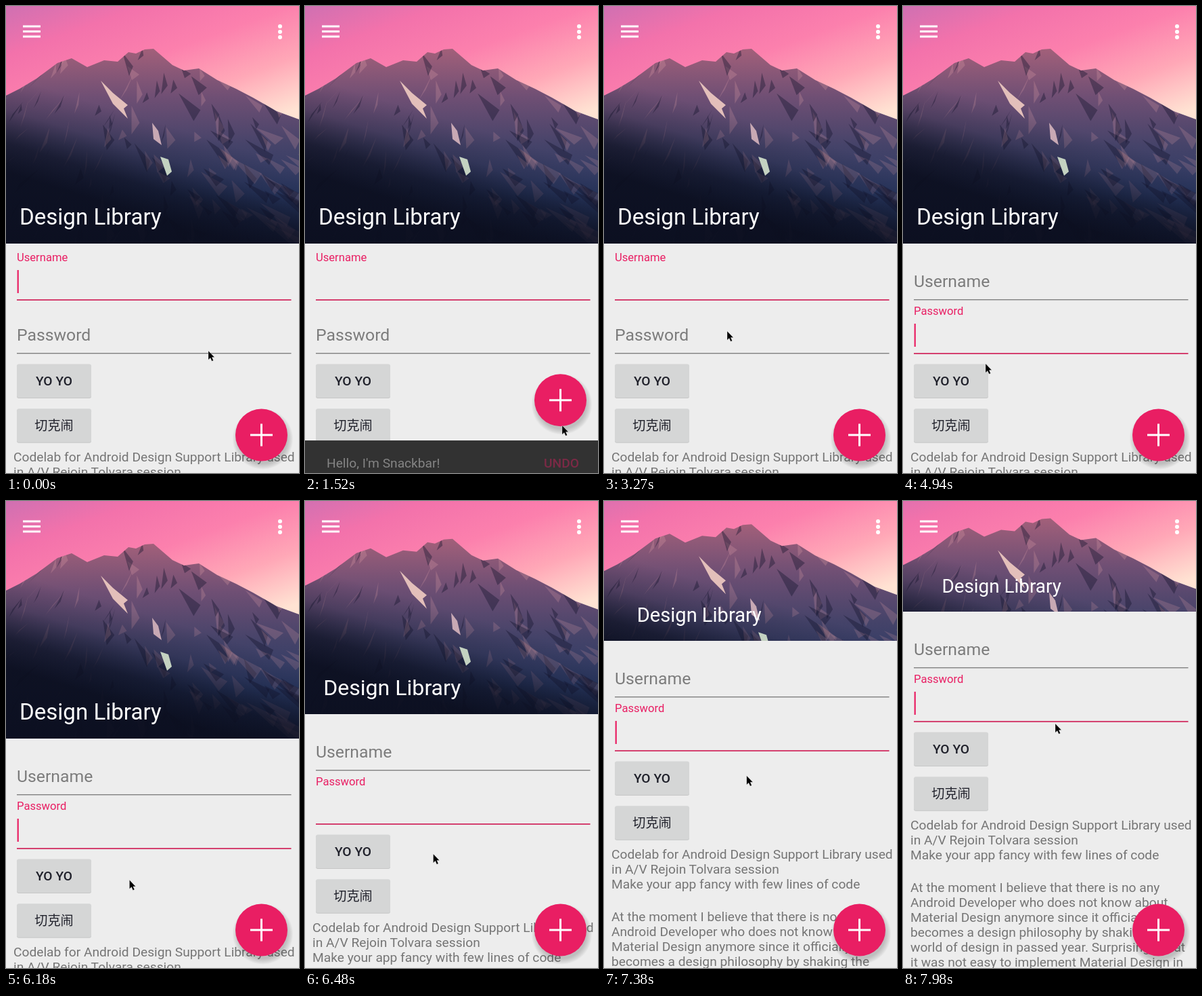
Animation of 433 by 688 pixels, one loop 8 s. Source, as an HTML page:

```html
<!DOCTYPE html>
<html lang="en">
<head>
<meta charset="utf-8">
<title>Design Library</title>
<style>
  html, body { margin: 0; width: 100%; height: 100%; overflow: hidden; background: #ededed; }
  svg { display: block; width: 100%; height: 100%; }
  text { font-family: Roboto, "Noto Sans CJK SC", "Noto Sans CJK", sans-serif; white-space: pre; }
  .body { font-size: 19.2px; fill: #757575; }
  .button { font-size: 19.2px; font-weight: 500; fill: #20212b; text-anchor: middle; }
</style>
</head>
<body>
<svg viewBox="0 0 433 688" preserveAspectRatio="none">
  <defs>
    <linearGradient id="sky" gradientUnits="userSpaceOnUse" x1="0" y1="0" x2="99" y2="272">
      <stop offset="0" stop-color="#cf70b2"/>
      <stop offset=".24" stop-color="#f372ab"/>
      <stop offset=".5" stop-color="#fc80ad"/>
      <stop offset=".75" stop-color="#ffa8b7"/>
      <stop offset="1" stop-color="#ffe3d3"/>
    </linearGradient>
    <linearGradient id="rock" gradientUnits="userSpaceOnUse" x1="0" y1="62" x2="0" y2="350">
      <stop offset="0" stop-color="#a3607a"/>
      <stop offset=".25" stop-color="#6f4f74"/>
      <stop offset=".5" stop-color="#454369"/>
      <stop offset=".75" stop-color="#2a3963"/>
      <stop offset="1" stop-color="#172444"/>
    </linearGradient>
    <linearGradient id="wood" gradientUnits="userSpaceOnUse" x1="220" y1="170" x2="180" y2="300">
      <stop offset="0" stop-color="#0b0e1e" stop-opacity="0"/>
      <stop offset=".35" stop-color="#0b0e1e" stop-opacity=".2"/>
      <stop offset=".7" stop-color="#0b0e1e" stop-opacity=".72"/>
      <stop offset="1" stop-color="#0b0e1e" stop-opacity=".93"/>
    </linearGradient>
    <radialGradient id="shade">
      <stop offset=".8" stop-color="#000" stop-opacity=".2"/>
      <stop offset=".92" stop-color="#000" stop-opacity=".09"/>
      <stop offset="1" stop-color="#000" stop-opacity="0"/>
    </radialGradient>
    <clipPath id="crop"><rect id="cropBox" width="433"/></clipPath>
    <path id="ridge" d="M0 132L20 122 45 107 76 84 97 77 120 90 145 80 165 82 181 68 192 70 205 64 218 63 232 75 246 87 263 95 285 92 312 109 340 122 365 135 400 155 433 167V350H0Z"/>
    <clipPath id="slope"><use href="#ridge"/></clipPath>
  </defs>

  <rect width="433" height="688" fill="#ededed"/>

  <g id="content">
    <g id="fields"></g>
    <g id="buttons"></g>
    <g id="copy"></g>
  </g>

  <g clip-path="url(#crop)">
    <g id="photo">
      <rect width="433" height="350" fill="url(#sky)"/>
      <use href="#ridge" fill="url(#rock)"/>
      <g id="facets" clip-path="url(#slope)"></g>
      <use href="#ridge" fill="url(#wood)"/>
      <path fill="#e3bfba" d="M140 110L158 128 180 146 174 151 180 166 158 144Z"/>
      <path fill="#c8a9b4" d="M216 172L225 184 230 205 218 196Z"/>
      <path fill="#c4d2c1" d="M228 222L240 226 245 244 238 250Z"/>
    </g>
  </g>
  <text id="title" fill="#fff">Design Library</text>
  <path d="M25 30H51M25 37.5H51M25 45H51" stroke="#fff" stroke-width="3"/>
  <path d="M405 30v0M405 38v0M405 46v0" stroke="#fff" stroke-width="6" stroke-linecap="round"/>

  <g id="snack">
    <rect width="433" height="67" fill="#323232"/>
    <g id="snackText" font-size="19.2">
      <text x="32" y="40" fill="#fff">Hello, I'm Snackbar!</text>
      <text x="405" y="40" fill="#e91e63" font-weight="500" text-anchor="end">UNDO</text>
    </g>
  </g>

  <g id="fab">
    <circle cx="2" cy="6" r="45" fill="url(#shade)"/>
    <circle r="38.5" fill="#e91e63"/>
    <path d="M-16.5 0H16.5M0 -16.5V16.5" stroke="#fff" stroke-width="3"/>
  </g>

  <path id="mouse" d="M0 0V13.2L3 10.4 5.2 15.2 7.5 14.2 5.4 9.6H9.2Z" fill="#000" stroke="#fff" stroke-opacity=".5" stroke-width=".6"/>
</svg>

<script>
const LOOP = 8000, HEADER = 350, SNACK = 67, BLINK = 600;
const PINK = [233, 30, 99], GREY = [124, 124, 124];
const $ = id => document.getElementById(id);
const mix = (a, b, p) => a + (b - a) * p;
const span = (t, start, end) => Math.min(1, Math.max(0, (t - start) / (end - start)));
const easeOut = p => 1 - (1 - p) ** 2;
const set = (el, attrs) => { for (const k in attrs) el.setAttribute(k, attrs[k]); };
const move = (id, x, y) => set($(id), { transform: `translate(${x} ${y})` });

// The screen refreshes in bursts (start, interval, count) and holds in between.
const ticks = [
  [280, 130, 4], [1130, 130, 10], [2670, 150, 7], [3880, 150, 4],
  [4630, 150, 1], [4940, 133, 8], [6180, 150, 13]
].flatMap(([start, gap, n]) => Array.from({ length: n }, (_, i) => start + gap * i));
const hold = t => ticks.reduce((last, tick) => tick <= t ? tick : last, 0);

// Pointer legs: leave, arrive, x, y.
const legs = [
  [150, 670, 380, 618],
  [2060, 2360, 378, 661],
  [2970, 3270, 182, 479],
  [3270, 3570, 144, 486],
  [4630, 4940, 122, 527],
  [4940, 5206, 170, 343],
  [5340, 5870, 181, 566],
  [6120, 7980, 225, 328]
];
const pointer = t => legs.reduce(([x, y], [leave, arrive, toX, toY]) => {
  const p = span(t, leave, arrive);
  return [mix(x, toX, p), mix(y, toY, p)];
}, [299, 508]);

// The drag slows down evenly.
function scrollAt(t) {
  const d = t - 6480;
  return t < 6180 ? 0 : Math.max(0, 36 + .149 * d - 3.22e-5 * d * d);
}

let seed = 7;
const rand = () => (seed = seed * 16807 % 2147483647) / 2147483647;
$('facets').innerHTML = Array.from({ length: 170 }, () => {
  const x = rand() * 433, depth = rand(), y = 62 + depth * 288;
  const len = 14 + rand() * 30, lean = (x - 200) / 250 + rand() - .5, light = rand() > .5;
  return `<path d="M${x} ${y}l${len * lean} ${len}l${4 + rand() * 9} ${-len * .4}z"
    fill="${light ? '#d89aa4' : '#14152f'}" opacity="${light ? .3 - .18 * depth : .4}"/>`;
}).join('');

const fields = ['Username', 'Password'].map((name, i) => {
  const g = document.createElementNS('http://www.w3.org/2000/svg', 'g');
  g.innerHTML = `<text x="16">${name}</text><rect x="16" width="405.5" y="432"/>
    <rect x="16.6" y="389" width="2.2" height="34" fill="#e91e63"/>`;
  set(g, { transform: `translate(0 ${i * 79})` });
  $('fields').append(g);
  const [label, line, caret] = g.children;
  return (float, focused, blink) => {
    const rgb = PINK.map((c, k) => Math.round(mix(GREY[k], c, float)));
    set(label, { y: mix(414, 376, float), 'font-size': mix(24.75, 16.6, float), fill: `rgb(${rgb})` });
    set(line, { height: focused ? 2 : 1.4, fill: focused ? '#d4406f' : '#808080' });
    set(caret, { visibility: focused && blink ? 'visible' : 'hidden' });
  };
});

$('buttons').innerHTML = ['YO YO', '切克闹'].map((name, i) => {
  const y = 527.5 + i * 65.8;
  return `<rect x="16" y="${y + 1}" width="110" height="49.5" rx="3" fill="#c6c7c7"/>
    <rect x="16" y="${y}" width="110" height="49.5" rx="3" fill="#d5d6d6"/>
    <text class="button" x="71" y="${y + 31.5}">${name}</text>`;
}).join('');

$('copy').innerHTML = [
  'Codelab for Android Design Support Library used',
  'in A/V Rejoin Tolvara session',
  'Make your app fancy with few lines of code',
  '',
  'At the moment I believe that there is no any',
  'Android Developer who does not know about',
  'Material Design anymore since it officially',
  'becomes a design philosophy by shaking the',
  'world of design in passed year. Surprisingly that',
  'it was not easy to implement Material Design in'
].map((line, i) => `<text class="body" x="11" y="${671 + i * 22 + (i > 3 ? 4.5 : 0)}">${line}</text>`).join('');

function render(t) {
  const scroll = scrollAt(t);
  move('content', 0, -scroll);
  set($('cropBox'), { height: HEADER - scroll });
  move('photo', 0, -.2 * scroll);
  set($('title'), { x: 20 + .2 * scroll, y: HEADER - 28 - scroll, 'font-size': 33.1 - .028 * scroll });

  const focus = span(t, 3830, 4130), second = t >= 3880, blink = t % BLINK < 250;
  fields[0](1 - focus, !second, blink);
  fields[1](focus, second, blink);

  const snack = easeOut(span(t, 1450, 1600)) * (1 - span(t, 2760, 2910));
  move('snack', 0, 688 - SNACK * snack);
  set($('snackText'), { opacity: span(t, 1480, 1580) });
  move('fab', 377.5, 632 - SNACK * snack ** .8);

  move('mouse', ...pointer(t));
}

const begin = performance.now();
function tick() {
  render(hold((performance.now() - begin) % LOOP));
  requestAnimationFrame(tick);
}
tick();
</script>
</body>
</html>
```
